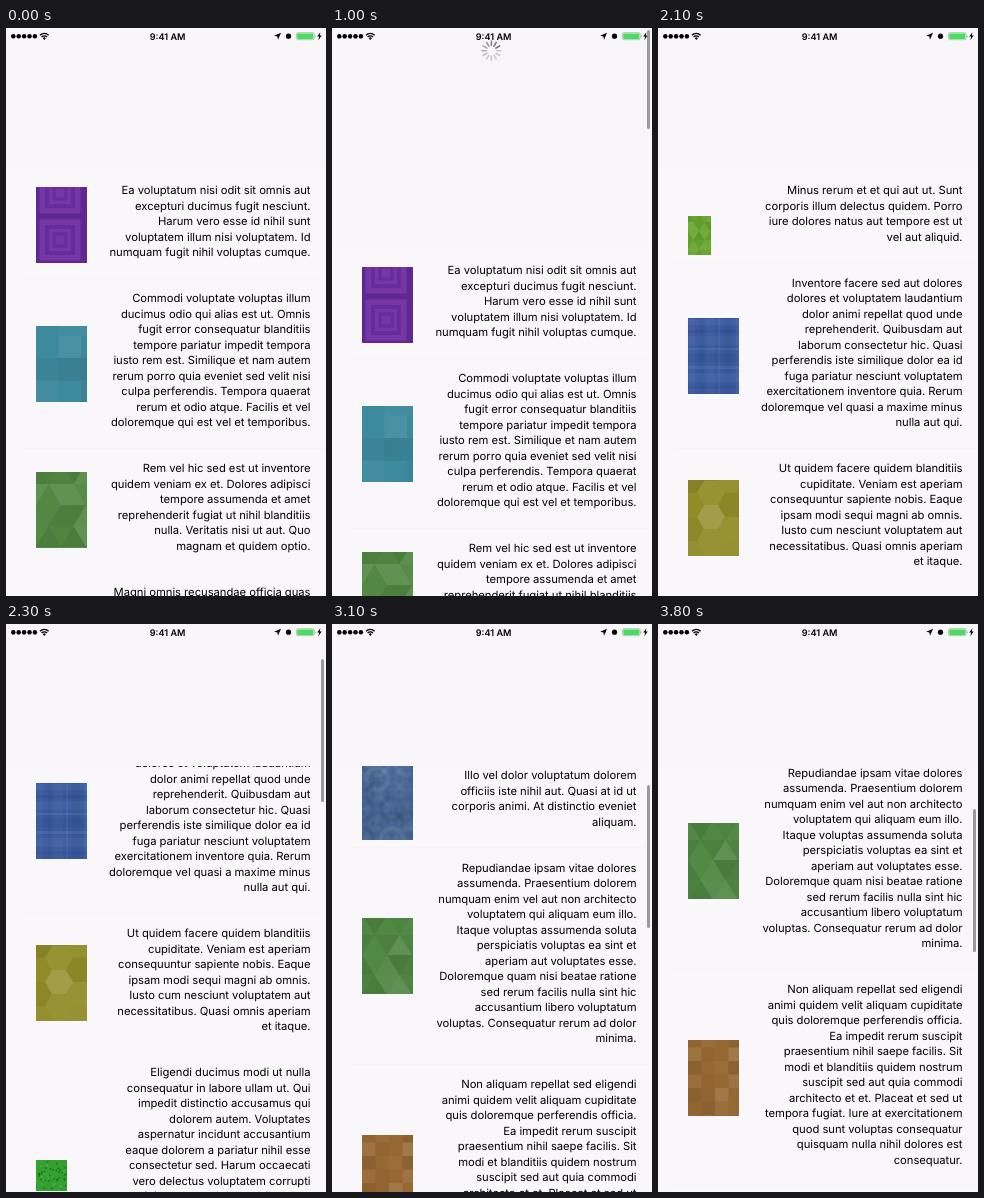
Write an HTML page that moves like this. It is 320 px wide and 568 px high and loops after 3900 ms.

```html
<!DOCTYPE html>
<html lang="en">
<head>
<meta charset="utf-8">
<title>Pull to refresh list</title>
<style>
  html, body { margin: 0; width: 100%; height: 100%; overflow: hidden; background: #f9f7fa; }
  #stage { position: relative; width: 320px; height: 568px; overflow: hidden; background: #f9f7fa; font-family: Inter, sans-serif; color: #000; text-rendering: geometricPrecision; }
  .list { position: absolute; left: 0; top: 142.5px; width: 320px; }
  .row { position: relative; }
  .row::after { content: ""; position: absolute; left: 15px; right: 0; bottom: 0; height: 1px; background: #f6f4f7; }
  .row p { position: absolute; right: 15.5px; top: 12.9px; margin: 0; white-space: pre; text-align: right; font-size: 11.25px; line-height: 15.5px; letter-spacing: -.04px; }
  .row svg { position: absolute; left: 30px; }
  #header { position: absolute; left: 0; top: 0; width: 320px; background: #f8f6f9; }
  #bar { position: absolute; left: 315.2px; width: 2.5px; border-radius: 2px; background: #9a999d; }
  #overlay { position: absolute; left: 0; top: 0; }
</style>
</head>
<body>
<div id="stage">
  <div class="list" id="oldList"></div>
  <div class="list" id="newList"></div>
  <div id="header"></div>
  <svg id="overlay" width="320" height="568">
    <g id="spinner" transform="translate(159.4 22.7)" stroke="#4c4c50" stroke-width="1.6" stroke-linecap="round"></g>
    <g id="dots"></g>
    <g fill="none" stroke="#000" stroke-width="1.3">
      <path d="M34 7.2a5.8 5.8 0 0 1 8.6 0M35.6 9a3.6 3.6 0 0 1 5.4 0"/>
      <path d="M38.3 11.9l-1.5-1.7a2 2 0 0 1 3 0z" fill="#000" stroke="none"/>
    </g>
    <text x="161.6" y="11.6" text-anchor="middle" font-family="Inter, sans-serif" font-size="9.1" font-weight="600">9:41 AM</text>
    <path d="M275 4.7l-3 7.1-.6-3.4-3.2-.6z"/>
    <circle cx="282.5" cy="8.2" r="2.6"/>
    <rect x="290.5" y="4.7" width="17.6" height="7" rx="1.4" fill="none" stroke="#8fc897" stroke-width=".8"/>
    <rect x="291.3" y="5.4" width="16" height="5.6" rx=".8" fill="#4cd964"/>
    <path d="M308.9 6.9q1.4 1.3 0 2.6z" fill="#777"/>
    <path d="M314.4 4.2l-3.2 4.4h2l-.9 3.6 3.4-4.7h-2z"/>
  </svg>
  <div id="bar"></div>
</div>
<script>
const $ = id => document.getElementById(id);
const range = n => [...Array(n).keys()];
const shade = a => `fill="${a < 0 ? '#000' : '#fff'}" fill-opacity="${Math.abs(a).toFixed(3)}"`;

function random(seed) {
  return () => (seed = (seed * 16807) % 2147483647) / 2147483647;
}

// Texture builders: each returns SVG markup for a 51 x 76 thumbnail.
function nested(cx, cy) {
  return [20.5, 15, 11, 7.5, 4.5].map((r, i) =>
    `<rect x="${cx - r}" y="${cy - r}" width="${2 * r}" height="${2 * r}" fill="${i % 2 ? '#682b9a' : '#7437a3'}"/>`).join('');
}

function squares(size, x0, y0, columns, levels) {
  return [...levels].map((level, i) =>
    `<rect x="${x0 + i % columns * size}" y="${y0 + Math.floor(i / columns) * size}" width="${size}" height="${size}" ${shade((level - 4) * .035)}/>`).join('');
}

function triangles(side, height, y0, seed) {
  const next = random(seed);
  return range(7).map(row => range(8).map(col => {
    const x = (col - 2) * side / 2, y = y0 + row * height;
    const up = (row + col) % 2;
    const [base, tip] = up ? [y + height, y] : [y, y + height];
    return `<path d="M${x} ${base}h${side}L${x + side / 2} ${tip}z" ${shade(next() * .18 - .09)}/>`;
  }).join('')).join('');
}

function plaid() {
  const bands = [[1, 6, .06], [12, 3, -.09], [18, 9, .05], [30, 2, .1], [36, 8, -.07], [48, 3, .1], [55, 9, .06], [68, 3, -.08]];
  return bands.map(([p, w, a]) =>
    `<rect y="${p}" width="51" height="${w}" ${shade(a * .7)}/><rect x="${p}" width="${w}" height="76" ${shade(a * .5)}/>`).join('');
}

function hexagons(r, seed) {
  const next = random(seed);
  const corners = range(6).map(i => [r * Math.cos(i * Math.PI / 3), r * Math.sin(i * Math.PI / 3)]);
  return range(4).map(col => range(5).map(row => {
    const x = 23 + (col - 1) * r * 1.5;
    const y = 37 + (row - 2 + (col % 2 ? 0 : .5)) * r * Math.sqrt(3);
    const alpha = col === 1 && row === 2 ? .15 : next() * .16 - .08;
    return `<polygon points="${corners.map(([a, b]) => [x + a, y + b])}" ${shade(alpha)}/>`;
  }).join('')).join('');
}

function rings(step, r, seed) {
  const next = random(seed);
  return range(6).map(row => range(5).map(col =>
    `<circle cx="${col * step}" cy="${row * step}" r="${r}" fill="none" stroke="${next() < .5 ? '#fff' : '#000'}" stroke-opacity="${(.02 + next() * .06).toFixed(3)}" stroke-width="${r * .4}"/>`
  ).join('')).join('');
}

function specks(seed) {
  const next = random(seed);
  return range(48).map(i =>
    `<rect x="${next() * 30}" y="${next() * 30}" width="1.6" height="1.6" ${shade(i % 3 ? -.3 : .15)}/>`).join('');
}

const thumb = (color, art, w = 51, h = 76) => ({ color, art, w, h });

const oldRows = [
  ['Ea voluptatum nisi odit sit omnis aut|excepturi ducimus fugit nesciunt.|Harum vero esse id nihil sunt|voluptatem illum nisi voluptatem. Id|numquam fugit nihil voluptas cumque.',
    thumb('#602691', nested(24, 6) + nested(24, 53))],
  ['Commodi voluptate voluptas illum|ducimus odio qui alias est ut. Omnis|fugit error consequatur blanditiis|tempore pariatur impedit tempora|iusto rem est. Similique et nam autem|rerum porro quia eveniet sed velit nisi|culpa perferendis. Tempora quaerat|rerum et odio atque. Facilis et vel|doloremque qui est vel et temporibus.',
    thumb('#3d899d', squares(22.5, 0, -13, 3, '455464322543'))],
  ['Rem vel hic sed est ut inventore|quidem veniam ex et. Dolores adipisci|tempore assumenda et amet|reprehenderit fugiat ut nihil blanditiis|nulla. Veritatis nisi ut aut. Quo|magnam et quidem optio.',
    thumb('#528843', triangles(25, 21, -9, 77))],
  ['Magni omnis recusandae officia quas']
];

const newRows = [
  ['Minus rerum et et qui aut ut. Sunt|corporis illum delectus quidem. Porro|iure dolores natus aut tempore est ut|vel aut aliquid.',
    thumb('#68a62f', triangles(11, 9, -3, 31), 23, 39)],
  ['Inventore facere sed aut dolores|dolores et voluptatem laudantium|dolor animi repellat quod unde|reprehenderit. Quibusdam aut|laborum consectetur hic. Quasi|perferendis iste similique dolor ea id|fuga pariatur nesciunt voluptatem|exercitationem inventore quia. Rerum|doloremque vel quasi a maxime minus|nulla aut qui.',
    thumb('#38599d', plaid())],
  ['Ut quidem facere quidem blanditiis|cupiditate. Veniam est aperiam|consequuntur sapiente nobis. Eaque|ipsam modi sequi magni ab omnis.|Iusto cum nesciunt voluptatem aut|necessitatibus. Quasi omnis aperiam|et itaque.',
    thumb('#918c28', hexagons(14, 19))],
  ['Eligendi ducimus modi ut nulla|consequatur in labore ullam ut. Qui|impedit distinctio accusamus qui|dolorem autem. Voluptates|aspernatur incidunt accusantium|eaque dolorem a pariatur nihil esse|consectetur sed. Harum occaecati|vero delectus voluptatem corrupti|suscipit autem sed dolor quibusdam|occaecati repudiandae. Numquam|mollitia et maiores qui.',
    thumb('#33a030', specks(5), 31, 31)],
  ['Illo vel dolor voluptatum dolorem|officiis iste nihil aut. Quasi at id ut|corporis animi. At distinctio eveniet|aliquam.',
    thumb('#486795', rings(15, 11, 23))],
  ['Repudiandae ipsam vitae dolores|assumenda. Praesentium dolorem|numquam enim vel aut non architecto|voluptatem qui aliquam eum illo.|Itaque voluptas assumenda soluta|perspiciatis voluptas ea sint et|aperiam aut voluptates esse.|Doloremque quam nisi beatae ratione|sed rerum facilis nulla sint hic|accusantium libero voluptatum|voluptas. Consequatur rerum ad dolor|minima.',
    thumb('#4f8743', triangles(25, 20, -3, 12))],
  ['Non aliquam repellat sed eligendi|animi quidem velit aliquam cupiditate|quis doloremque perferendis officia.|Ea impedit rerum suscipit|praesentium nihil saepe facilis. Sit|modi et blanditiis quidem nostrum|suscipit sed aut quia commodi|architecto et et. Placeat et sed ut|tempora fugiat. Iure at exercitationem|quod sunt voluptas consequatur|quisquam nulla nihil dolores est|consequatur.',
    thumb('#966833', squares(13.5, 0, -6, 4, '354263472452534623743254'))]
];

function rowMarkup([text, image]) {
  const lines = text.split('|');
  const height = lines.length * 15.5 + 30.5;
  // Thumbnails sit at the bottom left of a vertically centred 51 x 76 box.
  const picture = image
    ? `<svg width="${image.w}" height="${image.h}" style="top:${height / 2 + 38 - image.h}px;background:${image.color}">${image.art}</svg>`
    : '';
  return `<div class="row" style="height:${height}px">${picture}<p>${lines.join('\n')}</p></div>`;
}

$('oldList').innerHTML = oldRows.map(rowMarkup).join('');
$('newList').innerHTML = newRows.map(rowMarkup).join('');
$('dots').innerHTML = range(5).map(i => `<circle cx="${7.3 + i * 5.4}" cy="8.3" r="2.25"/>`).join('');
$('spinner').innerHTML = range(12).map(i => `<path d="M0 -5.2V-9.6" transform="rotate(${i * 30})"/>`).join('');
const petals = [...$('spinner').children];

const LOOP = 3900, STEP = 100, RELOAD = 1500, SPIN = 800;
const pullPoints = [[300, 0], [400, 8], [500, 33], [600, 61], [700, 86], [800, 98], [900, 99], [1000, 80], [1100, 60], [1200, 53], [1300, 51], [1400, 50], [1500, 3], [1600, 1], [1700, 0]];
const dragPoints = [[2100, 0], [2200, 36], [2300, 131]];

function follow(points, t) {
  if (t <= points[0][0]) return points[0][1];
  const i = points.findIndex(p => p[0] >= t);
  if (i < 0) return points[points.length - 1][1];
  const [t0, v0] = points[i - 1], [t1, v1] = points[i];
  return v0 + (v1 - v0) * (t - t0) / (t1 - t0);
}

// A finger drag followed by exponential deceleration.
const scrollAt = t => t <= 2300 ? follow(dragPoints, t) : 755 - 342 * Math.exp(-(t - 2600) / 500);

function drawSpinner(t, pull) {
  const spinning = t >= SPIN;
  const lead = Math.floor((t - SPIN) * .012);
  const shown = Math.floor(pull / 8.2);
  petals.forEach((petal, i) => {
    const age = ((lead - i) % 12 + 12) % 12;
    petal.setAttribute('opacity', spinning ? Math.max(.25, .8 - age * .08) : +(i < shown));
  });
  $('spinner').setAttribute('opacity', t < RELOAD ? 1 : Math.max(0, .5 - (t - RELOAD) / 300));
}

function drawBar(t, pull, scroll) {
  const stretch = t < 1000 ? pull * .9 : Math.max(0, pull - 51);
  const height = t < RELOAD ? 128 - stretch : 143;
  const visible = t >= 2200 || (t >= 400 && t <= RELOAD) ? 1 : t > RELOAD ? Math.max(0, 1 - (t - RELOAD) / 200) : 0;
  Object.assign($('bar').style, { top: 2 + scroll * .253 + 'px', height: height + 'px', opacity: visible });
}

function render(t) {
  const pull = follow(pullPoints, t);
  const scroll = scrollAt(t);
  const shift = `translateY(${Math.round(pull - scroll)}px)`;
  for (const id of ['oldList', 'newList']) {
    $(id).style.transform = shift;
    $(id).style.display = (id === 'oldList') === (t < RELOAD) ? 'block' : 'none';
  }
  $('header').style.height = 142 + Math.round(pull) + 'px';
  drawSpinner(t, pull);
  drawBar(t, pull, scroll);
}

const start = performance.now();
function tick() {
  const elapsed = (performance.now() - start) % LOOP;
  render(Math.floor(elapsed / STEP) * STEP);
  requestAnimationFrame(tick);
}
tick();
</script>
</body>
</html>
```
